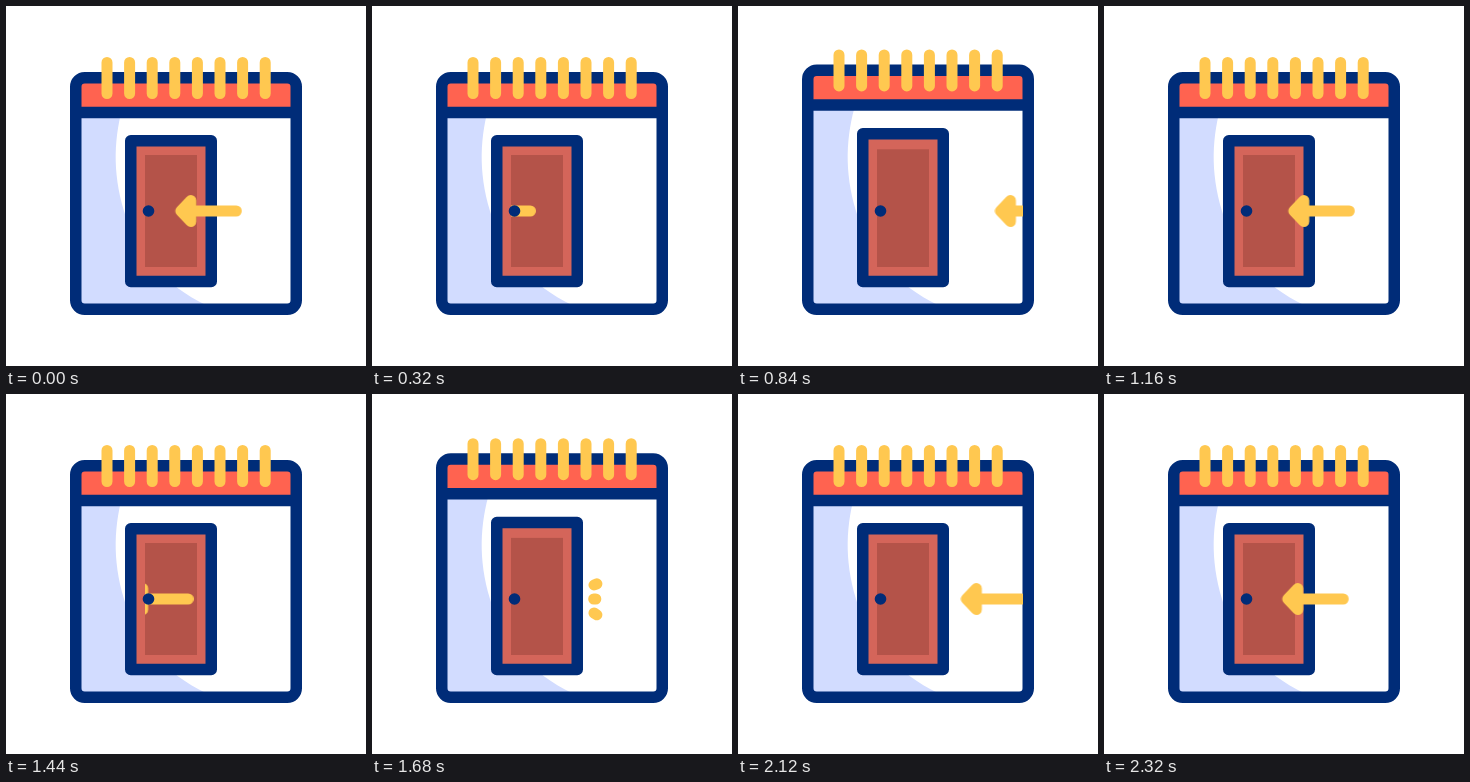
Recreate the animation shown at these times as an HTML page. Size 360 px wide and 360 px high, loop 2.36 s.

```html
<!DOCTYPE html>
<html lang="en">
<head>
<meta charset="utf-8">
<title>Calendar door</title>
<style>
  @property --d { syntax: "<length>"; inherits: true; initial-value: 8px; }

  html, body { margin: 0; width: 100%; height: 100%; overflow: hidden; background: #fff; }
  svg {
    display: block; width: 100vw; height: 100vh;
    --navy: #002c78; --gold: #ffc850;
    animation: stretch 2360ms ease-in-out infinite;
  }
  .line { fill: none; stroke: var(--navy); stroke-width: 11.5; stroke-linejoin: round; }
  .gold { fill: none; stroke: var(--gold); stroke-width: 11; stroke-linecap: round; stroke-linejoin: round; }

  /* --d lowers every top edge while the bottom edges stay put */
  .top { transform: translateY(var(--d)); }
  .page { y: calc(63.75px + var(--d)); height: calc(239.5px - var(--d)); }
  .door { y: calc(127.5px + var(--d) * .9); height: calc(148px - var(--d) * .9); }
  .panel { y: calc(143px + var(--d) * .75); height: calc(118px - var(--d) * .75); }

  .arrow { animation: fly 2360ms linear infinite; }
  .puff { stroke-dasharray: 1 3; animation: puff 2360ms linear infinite; }

  /* rest, one tall stretch as the arrow is swallowed, rest; twice per loop */
  @keyframes stretch {
    0%, 17.88% { --d: 8px; }
    29.75% { --d: -7px; }
    41.61%, 65.6% { --d: 8px; }
    77.46% { --d: -7px; }
    89.32%, 100% { --d: 8px; }
  }
  @keyframes fly {
    0% { transform: translateX(0); }
    18.47% { transform: translateX(-98px); }
    18.48%, 30.3% { transform: translateX(116px); }
    51.95% { transform: translateX(0); }
    70.42% { transform: translateX(-98px); }
    70.43%, 77.97% { transform: translateX(116px); }
    100% { transform: translateX(0); }
  }
  @keyframes puff {
    0%, 20.33% { stroke-dashoffset: 1; opacity: 0; }
    20.34% { stroke-dashoffset: 1; opacity: 1; }
    23.73%, 25.42% { stroke-dashoffset: 0; opacity: 1; }
    30% { stroke-dashoffset: -1; opacity: 1; }
    30.01% { stroke-dashoffset: -1; opacity: 0; }
    30.02%, 70.43% { stroke-dashoffset: 1; opacity: 0; }
    70.44% { stroke-dashoffset: 1; opacity: 1; }
    73.73%, 75.42% { stroke-dashoffset: 0; opacity: 1; }
    80% { stroke-dashoffset: -1; opacity: 1; }
    80.01%, 100% { stroke-dashoffset: -1; opacity: 0; }
  }
</style>
</head>
<body>
<svg viewBox="0 0 360 360">
  <clipPath id="way"><rect x="139" y="180" width="146" height="50"/></clipPath>

  <path fill="#d2dcff" d="M72 96H118C108 130 106 165 118 205C130 247 160 280 200 299H72Z"/>
  <g class="top">
    <rect x="72" y="64" width="217" height="34" fill="#ff6350"/>
    <path class="line" d="M70 98.5H290"/>
  </g>
  <rect class="line page" x="69.75" width="220.5" rx="9"/>
  <path class="gold top" d="M101 48.5v31m22.6-31v31m22.6-31v31m22.6-31v31m22.6-31v31m22.6-31v31m22.6-31v31m22.6-31v31"/>

  <rect class="line door" x="124.75" width="80.5" style="fill:#d4655a"/>
  <rect class="panel" x="139" width="52" fill="#b45349"/>

  <g clip-path="url(#way)">
    <path class="gold arrow" style="fill:var(--gold)" d="M175 205L185 194.5V215.5ZM182 205H230.5"/>
  </g>
  <circle cx="142.5" cy="205" r="5.8" fill="#002c78"/>
  <g class="gold">
    <path class="puff" pathLength="1" d="M222 191L234 186"/>
    <path class="puff" pathLength="1" d="M221.7 205H230.5"/>
    <path class="puff" pathLength="1" d="M222 219L234 226.5"/>
  </g>
</svg>
</body>
</html>
```
